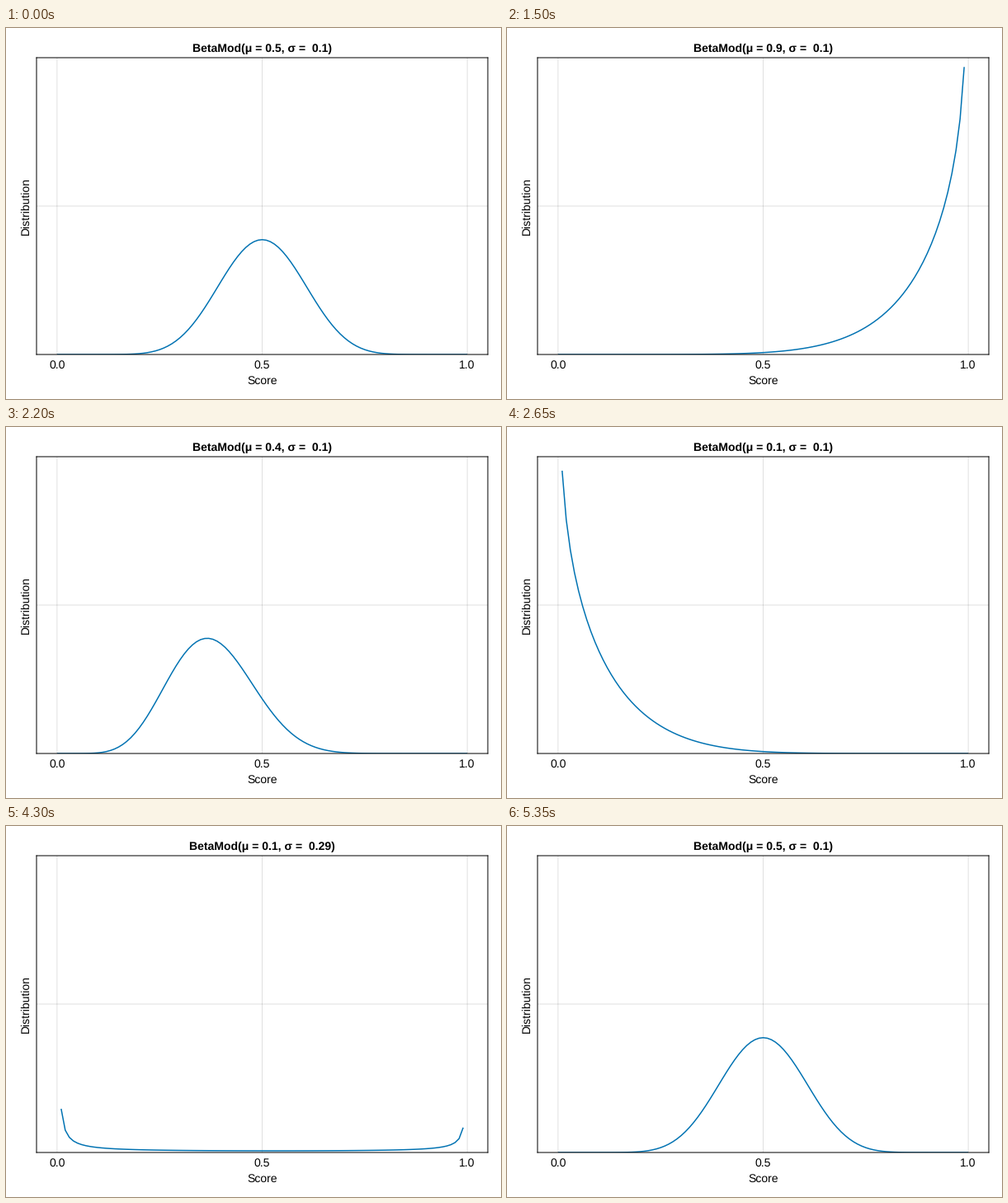
These frames come from a looping animation (600 by 450 pixels, 6000 ms). A matplotlib script:

```python
import math

import matplotlib.pyplot as plt
import numpy as np
from matplotlib.animation import FuncAnimation

W, H, DPI = 600, 450, 100
FRAMES, INTERVAL = 120, 50
LEFT, RIGHT, TOP, BOTTOM = 37, 584, 36, 396

plt.rcParams["font.family"] = "Liberation Sans"
plt.rcParams["text.hinting"] = "none"
FONT = 14 * 72 / DPI

# (start, end, parameter ranges), as fractions of the loop
MOVES = [
    (0.00, 0.15, {"mu": (0.5, 0.9)}),
    (0.25, 0.45, {"mu": (0.9, 0.1)}),
    (0.55, 0.65, {"sigma": (0.1, 0.3)}),
    (0.70, 0.90, {"mu": (0.1, 0.5), "sigma": (0.3, 0.1)}),
]


def px(width):
    return width * 72 / DPI


def params(n):
    """Mean and deviation at step n; each holds after its last sampled step."""
    last = FRAMES - 1
    state = {"mu": 0.5, "sigma": 0.1}
    for lo, hi, ranges in MOVES:
        if n / last < lo:
            break
        k = min(n, math.ceil(hi * last) - 1)
        t = (k / last - lo) / (hi - lo)
        p = (1 - math.cos(math.pi * t)) / 2
        for name, (a, b) in ranges.items():
            state[name] = a + (b - a) * p
    return state["mu"], state["sigma"]


def beta_pdf(x, mu, sigma):
    nu = mu * (1 - mu) / sigma**2 - 1
    a, b = mu * nu, (1 - mu) * nu
    log_b = math.lgamma(a) + math.lgamma(b) - math.lgamma(a + b)
    with np.errstate(divide="ignore", invalid="ignore"):
        y = x ** (a - 1) * (1 - x) ** (b - 1) * math.exp(-log_b)
    return np.where(np.isfinite(y), y, np.nan)


fig = plt.figure(figsize=(W / DPI, H / DPI), dpi=DPI, facecolor="white")
ax = fig.add_axes([LEFT / W, 1 - BOTTOM / H, (RIGHT - LEFT) / W, (BOTTOM - TOP) / H])
ax.set(xlim=(-0.05, 1.05), ylim=(0, 10), xticks=[], yticks=[])
for spine in ax.spines.values():
    spine.set(linewidth=px(1), snap=False)

grid = dict(color="black", alpha=0.12, lw=px(1), zorder=1, snap=False)
for gx in (0, 0.5, 1):
    ax.axvline(gx, **grid)
ax.axhline(5, **grid)


def label(x, y, text, **kw):
    return fig.text(x / W, 1 - y / H, text, ha="center", va="baseline",
                    rotation_mode="anchor", fontsize=FONT, color="black", **kw)


for gx in (0, 0.5, 1):
    label(LEFT + (gx + 0.05) / 1.1 * (RIGHT - LEFT), 413, f"{gx:.1f}")
label(310.5, 432, "Score")
label(28, 216, "Distribution", rotation=90)
title = label(310.5, 29, "", weight="bold")

xs = np.linspace(0, 1, 101)
curve, = ax.plot([], [], color="#0072B2", lw=px(1.5), solid_capstyle="butt")


def update(n):
    mu, sigma = params(n)
    curve.set_data(xs, beta_pdf(xs, mu, sigma))
    title.set_text(f"BetaMod(μ = {round(mu, 1)}, σ =  {round(sigma, 2)})")
    return curve, title


anim = FuncAnimation(fig, update, frames=FRAMES, interval=INTERVAL, repeat=True)
plt.show()
```
